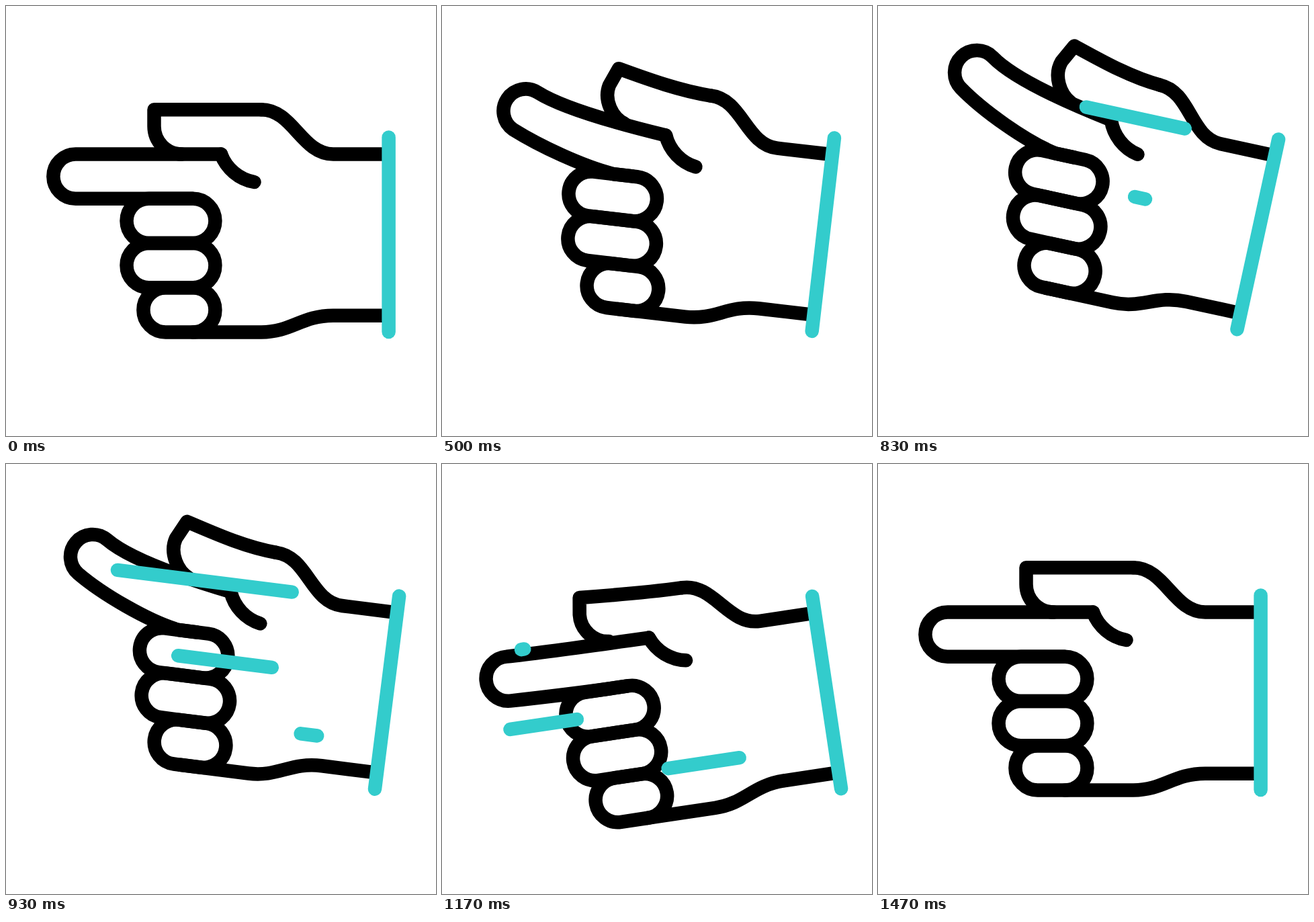
Animation of 640 by 640 pixels, one loop 1.67 s. Source, as an HTML page:

```html
<!DOCTYPE html>
<html lang="en">
<head>
<meta charset="utf-8">
<title>Pointing hand</title>
<style>
html, body { margin: 0; width: 100%; height: 100%; overflow: hidden; background: #fff; }
svg { display: block; width: 100vw; height: 100vh; }
path { fill: none; stroke: #000; stroke-width: 20.5; stroke-linecap: round; stroke-linejoin: round; }
.teal { stroke: #33cccc; }
</style>
</head>
<body>
<svg viewBox="0 0 640 640">
  <g id="hand">
    <path d="M566 460.7H487C440 460.7 425 485.5 380 485.5H278"/>
    <path id="ring3"/>
    <path id="ring2"/>
    <path id="ring1"/>
    <path id="thumb"/>
    <path id="index"/>
    <path d="M320 220.5C328 242 347 258 369.5 262"/>
    <path d="M380 154.2C427 154.2 440 220.5 487 220.5H566"/>
    <path class="teal" d="M569.6 195.6V485"/>
    <path class="teal" id="dash1"/>
    <path class="teal" id="dash2"/>
    <path class="teal" id="dash3"/>
  </g>
</svg>
<script>
const LOOP = 1670, STEP = 33.35;
const R = 33.1;             // half the thickness of a finger
const TILT = 0.585;         // fully bent fingertip, in radians

const shape = (id, d) => document.getElementById(id).setAttribute("d", d);
const pt = (x, y) => `${x.toFixed(2)} ${y.toFixed(2)} `;
const span = (k, a, b) => Math.min(1, Math.max(0, (k - a) / (b - a)));

// progress from a to b, eased like cubic-bezier(.5, 0, .5, 1)
function ease(k, a, b) {
  const s = 0.5 + Math.sinh(Math.asinh(4 * span(k, a, b) - 2) / 3);
  return s * s * (3 - 2 * s);
}
function smooth(k, a, b) {
  const x = span(k, a, b);
  return x * x * (3 - 2 * x);
}
const pulse = (k, a, b, c, d) => ease(k, a, b) - ease(k, c, d);

// a half-circle tip whose two sides run back into the hand
function drawIndex(b) {
  const cx = 103.5 + 6.3 * b, cy = 253.6 - 59.4 * b;
  const tip = TILT * b ** 0.75, side = TILT * b;
  const nx = R * Math.sin(tip), ny = -R * Math.cos(tip);
  const ux = 46 * Math.cos(side), uy = 46 * Math.sin(side);
  shape("index", "M320 220.5C" + pt(250, 220.5 - 11.5 * b)
    + pt(cx + nx + ux, cy + ny + uy) + pt(cx + nx, cy + ny)
    + `A${R} ${R} 0 0 0 ` + pt(cx - nx, cy - ny)
    + "C" + pt(cx - nx + ux, cy - ny + uy) + pt(203, 286.7 - 7.7 * b)
    + "250 286.7H278");
}

function drawThumb(b) {
  const baseX = 262 - 6.2 * b, baseY = 220.5 - 12.7 * b;
  const sideX = 220.5 + 9 * b, sideY = 179 - 28 * b;
  const tipX = 220.5 + 22.6 * b, tipY = 154.2 - 29.7 * b;
  shape("thumb", "M" + pt(baseX, baseY)
    + "C" + pt(baseX - 23 + 5 * b, baseY - 8 * b) + pt(sideX - 7.5 * b, sideY + 23)
    + pt(sideX, sideY) + "L" + pt(tipX, tipY)
    + "C" + pt(tipX + 46, tipY + 13.5 * b) + pt(335, 154.2 - 2 * b) + "380 154.2");
}

// a folded finger: a pill between two x positions
function drawRing(n, left, dx) {
  const top = 286.7 + 66.3 * (n - 1);
  const arc = `a${R} ${R} 0 0 1 0 `;
  shape("ring" + n, "M" + pt(left + dx, top) + `H${(278.3 + dx).toFixed(2)}`
    + arc + 2 * R + `H${(left + dx).toFixed(2)}` + arc + -2 * R + "Z");
}

// a stroke that runs leftwards: its tail follows the head six steps later
function drawDash(n, k, start, from, to, y) {
  const at = s => from + (to - from) * ease(k, s, s + 10);
  const head = at(start), tail = at(start + 6);
  shape("dash" + n, tail - head > 0.05 ? "M" + pt(tail, y) + `H${head.toFixed(2)}` : "");
}

function draw(k) {
  const angle = 13.2 * ease(k, 7.5, 22.5) - 22.2 * ease(k, 22.75, 36.65)
    + 9 * smooth(k, 36.65, 44);
  document.getElementById("hand")
    .setAttribute("transform", `rotate(${angle.toFixed(3)} 569.5 320)`);

  drawIndex(pulse(k, 7.5, 19.2, 27.4, 36.9));
  drawThumb(pulse(k, 7.5, 18.5, 26.3, 40.3));

  drawRing(1, 212.6, 16.8 * pulse(k, 7.5, 24.3, 27.4, 36.9));
  drawRing(2, 212.6, 28 * pulse(k, 8, 22.4, 27.4, 36.9));
  drawRing(3, 237.5, 34.5 * pulse(k, 8, 19.5, 25, 36.5));

  drawDash(1, k, 20, 430, 129.5, 209.6);
  drawDash(2, k, 23.15, 395, 95.5, 324.7);
  drawDash(3, k, 25, 474.6, 319.5, 417.1);
}

const begin = performance.now();
function tick() {
  const t = (performance.now() - begin) % LOOP;
  draw(Math.floor((t + 5) / STEP));
  requestAnimationFrame(tick);
}
tick();
</script>
</body>
</html>
```
